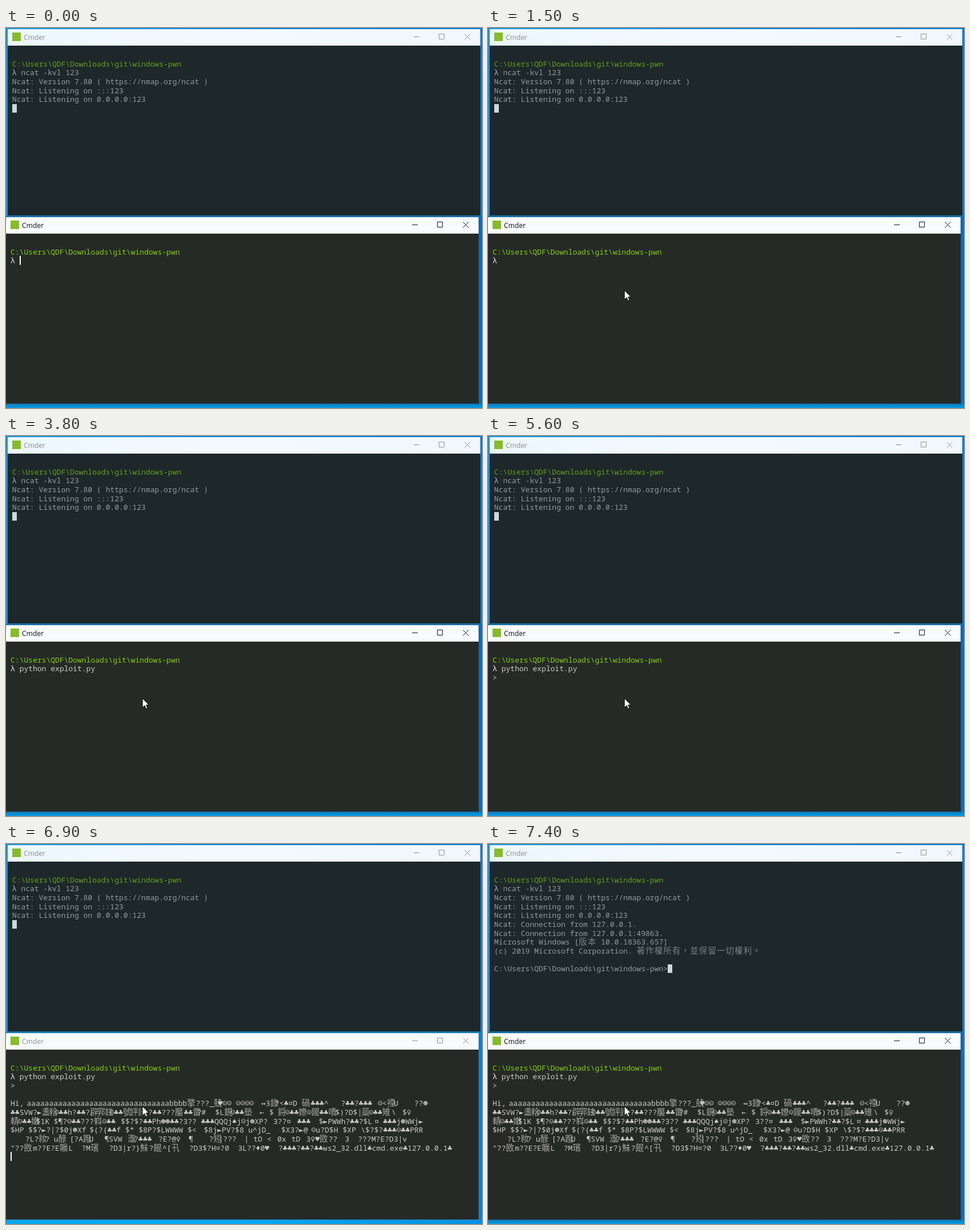
Write an HTML page with a canvas that moves like this. It is 837 px wide and 669 px high and loops after 8000 ms.

```html
<!DOCTYPE html>
<html lang="en">
<head>
<meta charset="utf-8">
<title>Two terminals</title>
<style>
html, body { margin: 0; width: 100%; height: 100%; overflow: hidden; background: #0a8fdc; }
canvas { display: block; }
</style>
</head>
<body>
<canvas id="stage" width="837" height="669"></canvas>
<script>
const ctx = document.getElementById('stage').getContext('2d');
const LOOP = 8000, CELL = 7.83, ROW = 15.67;
const MONO = '13.05px "Noto Sans Mono", "DejaVu Sans Mono", monospace';
const SYMBOLS = '13.05px "DejaVu Sans Mono", monospace';
const CJK = '300 14.5px "Noto Sans CJK TC", "Noto Sans CJK SC", "Noto Sans CJK JP", sans-serif';
const PATH = 'C:\\Users\\QDF\\Downloads\\git\\windows-pwn';

// Upper and lower window: left text edge, first row and colours
const upper = { x: 10.8, y: 54.7, text: '#929c9e', green: '#649e1b', lambda: '#aab4b5' };
const lower = { x: 8, y: 385.7, text: '#cacaca', green: '#83d20a', lambda: '#f0f0f0' };

const listening = [
  ' ncat -kvl 123',
  'Ncat: Version 7.80 ( https://nmap.org/ncat )',
  'Ncat: Listening on :::123',
  'Ncat: Listening on 0.0.0.0:123'
];
const connected = [
  'Ncat: Connection from 127.0.0.1.',
  'Ncat: Connection from 127.0.0.1:49863.',
  'Microsoft Windows [版本 10.0.18363.657]',
  '(c) 2019 Microsoft Corporation. 著作權所有，並保留一切權利。',
  '',
  PATH + '>'
];

// Binary output: left edge and text of each run, one array per row
const garbage = [
  [8, 'Hi,', 36.5, 'a'.repeat(32) + 'bbbb擎???_兢', 373, '♥☺☺ ☺☺☺☺', 449, '↔3錄', 473, '?<♣¤D', 520, '碢♣♣♣^',
    589, '?♣♣?♣♣♣', 654, '☺<禋', 682, 'U', 718, '??☻'],
  [8, '♣♣SVW?►盞', 76, '粭', 85, '☺♣♣h?♣♣?辟', 160, '郛', 174, '鉉', 182, '☺♣♣號', 218, '評', 232, '訊',
    250, '?♣♣???靨♣♣雷', 336, '?#', 368, '$L鋧', 395, '☺♣♣塾', 446, '←', 463, '$', 478, '鋝', 491, '☺♣♣嫽',
    529, '☺鍐', 551, '♣♣嘳', 579, '$)?D$|', 625, '蘂', 638, '☺♣♣雉', 678, '\\', 697, '$♀'],
  [8, '輤', 21, '☺♣♣嫩', 53, '$1K', 84, '$¶?☺♣♣???嵙', 169, '☺♣♣', 202, '$$?$?♣♣Ph☻☻♣♣?3??',
    343, '♣♣♣QQQj♠j☺j☻XP?', 470, '3??¤', 512, '♣♣♣', 550, '$►PWWh?♣♣?$L', 648, '¤', 663, '♣♣♣j☻WWj►'],
  [8, '$HP $$?►?|?$0j☻Xf', 147, '$(?{♣♣f $* $8P?$LWWWW $<', 348, '$8j►PV?$8', 426, 'u^jD_',
    484, '$X3?►@', 537, '☺u?D$H', 592, '$XP', 624, '\\$?$?♣♣♣☺♣♣PRR'],
  [34, '?L?籹', 69, '?', 84, 'u醁', 112, '[?A蹳', 146, 'U', 173, '¶SVW', 214, '瀊', 225, '?♣♣♣', 268, '?E?@♀',
    321, '¶', 357, '?矧', 374, '|???', 419, '|', 435, 'tO', 459, '<', 477, '0x', 502, 'tD', 528, '3♀♥敃??',
    596, '3', 619, '???M?E?D3|v'],
  [8, '"??敃m??E?E矌L', 133, '?M璸', 181, '?D3|r?}鮇?餛^[卂', 322, '?D3$?H¤?0', 408, '3L??♦0♥',
    479, '?♣♣♣?♣♣?♣♣ws2_32.dll♣cmd.exe♣127.0.0.1♣']
];

// Text cursor in the lower window: time, column, row (no column = hidden)
const carets = [
  [0, 2, 1], [500], [1000, 2, 1], [1500], [1900, 7, 1], [2400, 20, 1], [3000],
  [3300, 0, 2], [3800], [4000, 1, 2], [4500], [5100, 1, 2], [5600], [6100, 1, 2],
  [6500, 0, 3], [6900, 0, 10], [7400]
];
// Pointer: time, x, y
const pointer = [[200, 232, 0], [300, 231, 190], [400, 235, 385], [500, 239, 466], [600, 240, 462]];

const latest = (list, t) => list.filter(e => e[0] <= t).pop();

function rect(color, x, y, w, h) {
  ctx.fillStyle = color;
  ctx.fillRect(x, y, w, h);
}

function shade(x0, y0, x1, y1, ...colors) {
  const g = ctx.createLinearGradient(x0, y0, x1, y1);
  colors.forEach((c, i) => g.addColorStop(i / (colors.length - 1), c));
  return g;
}

// Puts each character on the terminal grid; Chinese ones take two cells and look thinner
function print(text, x, top, color) {
  ctx.fillStyle = color;
  for (const ch of text) {
    const wide = ch >= '\u3000';
    ctx.font = wide ? CJK : ch >= '\u2000' ? SYMBOLS : MONO;
    ctx.globalAlpha = wide ? 0.78 : 1;
    if (ch !== ' ') ctx.fillText(ch, x, top + 13);
    x += wide ? CELL * 2 : CELL;
  }
  ctx.globalAlpha = 1;
}

function line(win, row, text, color = win.text, col = 0) {
  print(text, win.x + col * CELL, win.y + row * ROW, color);
}

function prompt(win, command) {
  line(win, 0, PATH, win.green);
  line(win, 1, 'λ', win.lambda);
  line(win, 1, command, win.text, 1);
}

function frame(x, y, w, bar, body, ink) {
  rect(body, x, y, w, 328);
  rect(bar, x, y, w, 29);
  rect('#86bc25', x + 8, y + 6, 15, 15);
  ctx.fillStyle = ink;
  ctx.font = '12.2px "Open Sans", "Noto Sans", sans-serif';
  ctx.fillText('Cmder', x + 28, y + 18.5);
  ctx.strokeStyle = ink;
  ctx.lineWidth = 1;
  ctx.beginPath();
  ctx.moveTo(x + 714, y + 13.5);
  ctx.lineTo(x + 724, y + 13.5);
  ctx.rect(x + 758.5, y + 8.5, 9, 9);
  ctx.moveTo(x + 803.5, y + 8.5);
  ctx.lineTo(x + 813.5, y + 18.5);
  ctx.moveTo(x + 813.5, y + 8.5);
  ctx.lineTo(x + 803.5, y + 18.5);
  ctx.stroke();
}

function desktop(active) {
  rect(shade(0, 0, 837, 0, '#1097df', '#0a86d4', '#0878d0'), 0, 0, 837, 669);
  rect(active ? '#0c6cb8' : '#0b7fd2', 831, 331, 6, 330);
  rect(active ? shade(0, 660, 0, 669, '#0b76b4', '#0a9be2') : shade(0, 0, 837, 0, '#08a8f0', '#04a8f4', '#0890e0'),
    0, 660, 837, 9);
  rect('#1379b8', 0, 330, 834, 2);
  rect(active ? '#1b5a86' : '#2a80b0', 0, 332, 832, 330);
}

function arrow(x, y) {
  const points = [[0, 0], [0, 16], [3.8, 12.6], [6.3, 18], [8.8, 17], [6.4, 11.5], [11, 11.3]];
  ctx.beginPath();
  points.forEach(([dx, dy]) => ctx.lineTo(x + dx, y + dy));
  ctx.closePath();
  ctx.fillStyle = '#fff';
  ctx.fill();
  ctx.strokeStyle = '#111';
  ctx.lineWidth = 1;
  ctx.stroke();
}

function draw(t) {
  const active = t < 6800 || t >= 7300;
  const online = t >= 7000;
  desktop(active);

  frame(3, 2, 831, shade(3, 0, 834, 0, '#ecf6fd', '#f3faff', '#f1f7fc'), '#1e282a', '#8b9094');
  prompt(upper, listening[0]);
  listening.slice(1).forEach((s, i) => line(upper, i + 2, s));
  if (online) connected.forEach((s, i) => line(upper, i + 5, s));
  const [col, row] = online ? [39, 10] : [0, 5];
  rect('#cddadb', Math.round(upper.x + col * CELL), Math.round(upper.y + row * ROW + 0.6), 8, 15);

  frame(0, 333, 831, '#f8fcff', '#262a27', active ? '#111' : '#8b9094');
  prompt(lower, t < 1900 ? '' : t < 2400 ? ' pytho' : ' python exploit.py');
  if (t >= 4000) line(lower, 2, '>');
  if (t >= 6900) {
    garbage.forEach((runs, i) => {
      for (let k = 0; k < runs.length; k += 2)
        print(runs[k + 1], runs[k], lower.y + (i + 4) * ROW, lower.text);
    });
  }
  const [, c, r] = latest(carets, t);
  if (c !== undefined) rect('#fff', Math.round(lower.x + c * CELL), Math.round(lower.y + r * ROW), 2, 16);

  const p = latest(pointer, t);
  if (p) arrow(p[1], p[2]);
}

const start = performance.now();
function tick() {
  draw((performance.now() - start) % LOOP);
  requestAnimationFrame(tick);
}
tick();
</script>
</body>
</html>
```
